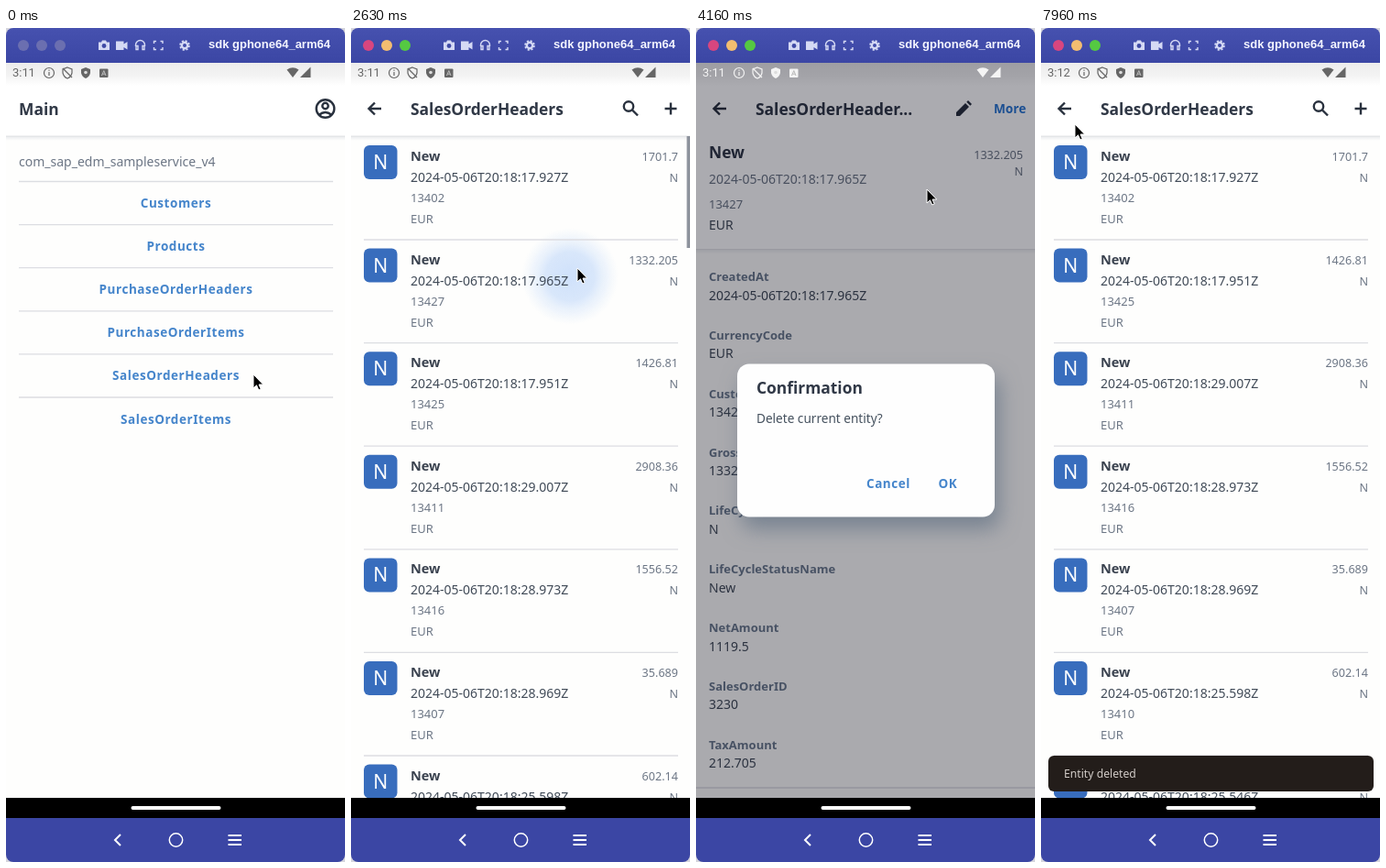
These frames come from a looping animation (370 by 910 pixels, 8 s). An HTML page:

```html
<!DOCTYPE html>
<html lang="en">
<head>
<meta charset="utf-8">
<title>Sales orders on a phone emulator</title>
<style>
  html, body { margin: 0; width: 100%; height: 100%; overflow: hidden; background: #d4d4dc; }
  svg { display: block; }
  text { font-family: "Noto Sans", "Open Sans", sans-serif; font-size: 13px; fill: #6c7685; white-space: pre; }
  .title { font-size: 17.4px; font-weight: 700; fill: #303846; }
  .name { font-size: 14.5px; font-weight: 700; fill: #3a424f; }
  .value { font-size: 14px; fill: #414b58; }
  .muted { font-size: 14px; }
  .label { font-size: 13px; font-weight: 700; fill: #6b7a8d; }
  .link { font-size: 13.5px; font-weight: 700; letter-spacing: .55px; fill: #4585cb; }
  .more { font-size: 13.6px; font-weight: 700; fill: #2a77d2; }
  .initial { font-size: 21px; fill: #fff; }
  .device { font: 700 13px "Liberation Sans", Arial, sans-serif; fill: #f4f5ff; }
  .clock { font: 13px Roboto, sans-serif; fill: currentColor; }
  .mid { text-anchor: middle; }
  .end { text-anchor: end; font-size: 12.6px; }
  .line { fill: none; stroke: #29313e; stroke-width: 2.4; }
  .rule { stroke: #dcdde2; stroke-width: 1.3; }
  #box { filter: drop-shadow(5px 13px 11px rgba(70, 92, 116, .5)); }
</style>
</head>
<body>
<script>
const LOOP = 8000;
const SLIDE = 'cubic-bezier(.4,0,.2,1)';

const text = (x, y, str, cls = '') => `<text x="${x}" y="${y}" class="${cls}">${str}</text>`;
const rect = (x, y, w, h, fill, r = 0, extra = '') =>
  `<rect x="${x}" y="${y}" width="${w}" height="${h}" rx="${r}" fill="${fill}" ${extra}/>`;
const circle = (x, y, r, attrs) => `<circle cx="${x}" cy="${y}" r="${r}" ${attrs}/>`;
const path = (d, attrs = 'class="line"') => `<path d="${d}" ${attrs}/>`;
const group = (id, ...parts) => `<g id="${id}">${parts.join('')}</g>`;
const rule = y => path(`M14 ${y}H357`, 'class="rule"');
const shade = y => rect(0, y, 370, 1.5, '#e4e5e8') + rect(0, y + 1.5, 370, 4, 'url(#fade)');

// Pages
const page = () => rect(0, 38, 370, 802, '#fefefd');
const header = () => rect(0, 38, 370, 80, '#fff') + shade(117.5);
const backArrow = path('M33 88H20M26 81.5 19.5 88 26 94.5');
const listTools =
  circle(303, 85.5, 5.2, 'class="line"') + path('M307 89.5 313 95.5') + path('M342.5 88H355.5M349 81.5V94.5');

function mainPage() {
  const services = ['Customers', 'Products', 'PurchaseOrderHeaders', 'PurchaseOrderItems',
    'SalesOrderHeaders', 'SalesOrderItems'];
  const account = circle(348.5, 88, 9.8, 'class="line"') + circle(348.5, 85, 3.2, 'class="line"') +
    path('M341.5 95Q348.5 89 355.5 95');
  return page() + header() + text(14, 95, 'Main', 'title') + account +
    text(14, 150.5, 'com_sap_edm_sampleservice_v4', 'muted') +
    services.map((s, i) => rule(167.5 + i * 47.1) + text(185.5, 196 + i * 47.1, s, 'link mid')).join('');
}

const orders = [
  ['17.927', 13402, '1701.7'], ['17.965', 13427, '1332.205'], ['17.951', 13425, '1426.81'],
  ['29.007', 13411, '2908.36'], ['28.973', 13416, '1556.52'], ['28.969', 13407, '35.689'],
  ['25.598', 13410, '602.14'], ['25.546', 13408, '914.3']
];
const stamp = seconds => `2024-05-06T20:18:${seconds}Z`;

function orderRow([seconds, customer, amount], i) {
  return `<g transform="translate(0 ${i * 112.6})">` +
    rect(14, 128, 36.5, 37, '#386dbd', 6) + text(32.2, 154, 'N', 'initial mid') +
    text(65, 145, 'New', 'name') + text(65, 168, stamp(seconds), 'value') +
    text(65, 190, customer) + text(65, 213, 'EUR') +
    text(357, 145, amount, 'end') + text(357, 168, 'N', 'end') + rule(231) + '</g>';
}
const rows = list => list.slice(0, 7).map(orderRow).join('');

function detailPage() {
  const fields = {
    CreatedAt: stamp('17.965'), CurrencyCode: 'EUR', CustomerID: 13427, GrossAmount: '1332.205',
    LifeCycleStatus: 'N', LifeCycleStatusName: 'New', NetAmount: '1119.5',
    SalesOrderID: 3230, TaxAmount: '212.705'
  };
  const pencil = path('M284 96V92L294 82 298 86 288 96ZM295.3 80.7 297 79 301 83 299.3 84.7Z', 'fill="#29313e"');
  return page() + rect(0, 38, 370, 203, '#fff') + shade(241) +
    group('detailTitle', text(14, 95, 'SalesOrderHeader...', 'title')) +
    group('detailTools', backArrow, pencil, text(325, 93, 'More', 'more')) +
    text(14, 141.5, 'New', 'title') + text(14, 169.5, stamp('17.965'), 'muted') +
    text(14, 196.5, '13427') + text(14, 219.5, 'EUR', 'value') +
    text(357, 142.5, '1332.205', 'end') + text(357, 160.5, 'N', 'end') +
    Object.entries(fields).map(([label, value], i) =>
      text(14, 276 + i * 63.85, label, 'label') + text(14, 296.5 + i * 63.85, value, 'value')).join('') +
    path('M0 829H370', 'class="rule"');
}

// Emulator window
function statusBar() {
  const outline = 'fill="none" stroke="currentColor" stroke-width="1.2"';
  const solid = 'fill="currentColor"';
  const shield = 'M0-6 5-4V0Q4 4.5 0 6-4 4.5-5 0V-4Z';
  return group('status',
    text(7, 53, '3:1', 'clock'),
    group('minuteOld', text(24.5, 53, '1', 'clock')), group('minuteNew', text(24.5, 53, '2', 'clock')),
    circle(47, 49, 5.5, outline), path('M47 48V52M47 45.5V46.8', outline),
    path(shield, outline + ' transform="translate(67 49)"'), path('M62 44 72 54', outline),
    path(shield, solid + ' transform="translate(87 49)"'), circle(87, 48.5, 1.8, 'fill="#ddd"'),
    rect(102, 44.5, 9.5, 9.5, 'currentColor', 1),
    path('M104.5 52 106.8 46.5 109 52M105.3 50.2H108.3', 'fill="none" stroke="#bbb"'),
    path('M306.5 45.5Q313 41 319.5 45.5L313 54Z', solid), path('M321 54H332.5V42.5Z', solid));
}

function windowBars() {
  const icon = 'fill="none" stroke="#d5d9f4" stroke-width="1.4"';
  const dots = colors => colors.map((c, i) => circle(19 + i * 20, 19, 6, `fill="${c}"`)).join('');
  const nav = 'fill="none" stroke="#fff" stroke-width="2"';
  return rect(0, 0, 370, 38, 'url(#bar)') +
    group('idle', dots(['#6b6fb0', '#6b6fb0', '#6b6fb0'])) +
    group('active', dots(['#d8467f', '#f3bd70', '#55c942'])) +
    path('M101 15.5H104L105 13.5H109L110 15.5H113V24H101Z', 'fill="#d5d9f4"') + circle(107, 19.5, 2.4, 'fill="#3f49a5"') +
    path('M120 14.5H128.5V17.5L132.5 15V23.5L128.5 21V24H120Z', 'fill="#d5d9f4"') +
    path('M141.5 20V18.5A5 5 0 0 1 151.5 18.5V20M142 19.5V23.5H144V19.5ZM149 19.5V23.5H151V19.5Z', icon) +
    path('M161.5 17V14.5H164M168.5 14.5H171V17M171 21V23.5H168.5M164 23.5H161.5V21', icon) +
    circle(195, 19, 3.2, 'fill="none" stroke="#d5d9f4" stroke-width="2.4"') +
    circle(195, 19, 5, 'fill="none" stroke="#d5d9f4" stroke-width="1.6" stroke-dasharray="2.2 1.727"') +
    text(221, 22, 'sdk gphone64_arm64', 'device') +
    rect(0, 840, 370, 22, '#000') + rect(136.5, 849, 98, 4, '#fff', 2) +
    rect(0, 862, 370, 48, '#3b46a4') +
    path('M125 880 119 886 125 892', nav) + circle(185.5, 886, 7.2, 'fill="none" stroke="#fff" stroke-width="1.5"') +
    path('M242.5 881H257M242.5 886H257M242.5 891H257', nav);
}

const dialog = group('box',
  rect(45, 366.5, 281, 167, '#fefefe', 13),
  text(66, 399, 'Confirmation', 'title'),
  `<text x="66" y="431" style="font-size:13.6px;fill:#46525f">Delete current entity?</text>`,
  text(186, 502, 'Cancel', 'link'), text(264.5, 502, 'OK', 'link'));

const toast = group('toast',
  rect(8, 794, 355, 39, '#231d1a', 6),
  `<text x="25" y="818" style="font-size:12.2px;fill:#d2ccc8">Entity deleted</text>`);

const pointer = group('pointer',
  path('M0 0V15L3.5 11.8 5.8 17 8.2 16 6 11H10.7Z', 'fill="#000" stroke="#fff" stroke-width="1" stroke-linejoin="round"'));

document.body.innerHTML = `<svg width="370" height="910" viewBox="0 0 370 910">
  <defs>
    <linearGradient id="bar" x2="0" y2="1"><stop stop-color="#4651af"/><stop offset="1" stop-color="#3b46a4"/></linearGradient>
    <linearGradient id="fade" x2="0" y2="1"><stop stop-color="#eeeff1"/><stop offset="1" stop-color="#eeeff1" stop-opacity="0"/></linearGradient>
    <linearGradient id="haze" x2="0" y2="1"><stop stop-color="#ececec"/><stop offset=".55" stop-color="#f3f3f3"/><stop offset="1" stop-color="#fff"/></linearGradient>
    <radialGradient id="glow"><stop stop-color="#cfe1fb"/><stop offset=".5" stop-color="#d4e4fa" stop-opacity=".9"/><stop offset="1" stop-color="#e2edfb" stop-opacity="0"/></radialGradient>
    <clipPath id="window"><rect width="370" height="910" rx="8"/></clipPath>
  </defs>
  <g clip-path="url(#window)">
    ${page()}
    ${group('main', mainPage())}
    ${group('list', page(), group('ripple', circle(239, 271, 53, 'fill="url(#glow)"')), rows(orders), header(),
      group('listTitle', text(14, 95, 'SalesOrderHeaders', 'title')),
      group('listTools', backArrow, listTools, rect(366.5, 118, 3.5, 122, '#8d929c')))}
    ${group('detail', detailPage())}
    ${group('listAfter', page(), rows(orders.filter((_, i) => i !== 1)), header(),
      text(65, 95, 'SalesOrderHeaders', 'title'), backArrow, listTools)}
    ${rect(0, 38, 370, 25, 'url(#haze)')}
    ${group('dim', rect(0, 38, 370, 802, '#000012', 0, 'opacity=".33"'))}
    ${statusBar()}${dialog}${toast}${windowBars()}${pointer}
  </g>
</svg>`;

// Motion: stops are [time in ms, value]
const rules = [];
function animate(id, prop, stops, easing = 'linear') {
  const full = [[0, stops[0][1]], ...stops, [LOOP, stops.at(-1)[1]]];
  const frames = full.map(([ms, value]) => `${ms / LOOP * 100}%{${prop}:${value}}`).join('');
  rules.push(`@keyframes ${id}{${frames}}#${id}{animation:${id} ${LOOP}ms ${easing} infinite}`);
}
const shift = (x, y = 0) => `translate(${x}px,${y}px)`;
const slide = (id, ...stops) => animate(id, 'transform', stops.map(([ms, x]) => [ms, shift(x)]), SLIDE);
const swap = (id, prop, ms, before, after) => animate(id, prop, [[ms - 1, before], [ms, after]]);
const fade = (id, ...stops) => animate(id, 'opacity', stops);

slide('main', [1677, 0], [2077, -370]);
slide('list', [1677, 370], [2077, 0], [2770, 0], [3160, -370]);
slide('detail', [2770, 370], [3160, 0], [7050, 0], [7440, 370]);
slide('listAfter', [7050, -370], [7440, 0]);

swap('listTitle', 'transform', 2100, shift(0), shift(51));
swap('listTools', 'opacity', 2100, 0, 1);
swap('detailTitle', 'transform', 3160, shift(0), shift(51));
swap('detailTools', 'opacity', 3160, 0, 1);
swap('idle', 'opacity', 31, 1, 0);
swap('active', 'opacity', 31, 0, 1);
swap('minuteOld', 'opacity', 7060, 1, 0);
swap('minuteNew', 'opacity', 7060, 0, 1);

fade('ripple', [2400, 0], [2560, 1], [2680, 1], [2800, 0]);
fade('dim', [4100, 0], [4155, 1], [6460, 1], [6630, 0]);
fade('box', [4100, 0], [4155, 1], [6380, 1], [6630, 0]);
fade('toast', [7300, 0], [7440, 1]);
animate('status', 'color', [[4100, '#666'], [4155, '#f4f4f4'], [6460, '#f4f4f4'], [6630, '#666']]);

animate('pointer', 'transform', [
  [830, 270, 378], [1330, 231, 378], [1930, 231, 378], [2330, 247, 262], [2800, 247, 262],
  [3200, 252, 230], [3500, 340, 92], [3600, 340, 92], [3900, 252, 176], [4430, 252, 176],
  [5160, 278, 494], [7050, 278, 494], [7930, 37, 105]
].map(([ms, x, y]) => [ms, shift(x, y)]), 'ease-in-out');

const style = document.createElement('style');
style.textContent = rules.join('\n');
document.head.append(style);
</script>
</body>
</html>
```
